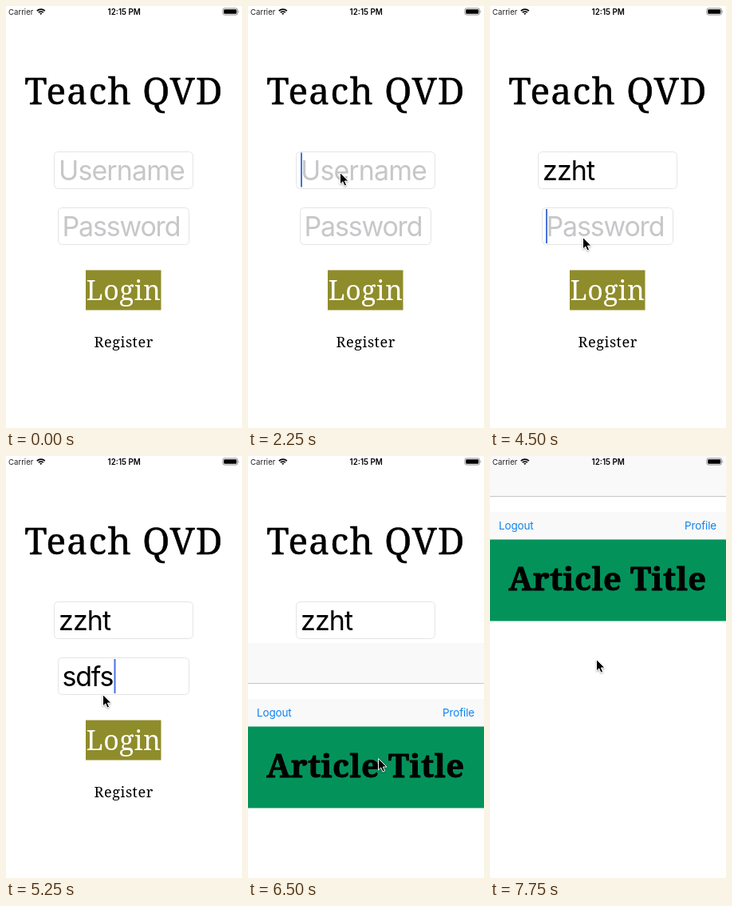
Recreate the animation shown at these times as an HTML page. Size 296 px wide and 528 px high, loop 8 s.

```html
<!DOCTYPE html>
<html lang="en">
<head>
<meta charset="utf-8">
<title>Login flow</title>
<style>
html, body { margin: 0; height: 100%; overflow: hidden; background: #fff; }
svg { display: block; width: 100vw; height: 100vh; }
text { font-family: Inter, Roboto, sans-serif; white-space: pre; }
.slab { font-family: "Noto Serif", serif; stroke-linejoin: round; }
.field rect { fill: #fff; stroke: #e4e4e4; }
.field text { font-size: 34px; letter-spacing: -.9px; }
#pass { letter-spacing: -1.2px; }
.hint { fill: #c7c7ca; }
.caret { fill: #4673dc; }
.link { font-size: 13.5px; letter-spacing: -.15px; fill: #0f83ee; }
</style>
</head>
<body>
<svg viewBox="0 0 296 528">
  <text class="slab" x="148" y="123" font-size="46" letter-spacing="1.3" stroke="#000" stroke-width=".5" text-anchor="middle">Teach QVD</text>

  <g class="field">
    <rect x="60.5" y="182.5" width="174" height="46" rx="5"/>
    <text id="user" x="66" y="218"></text>
    <rect x="65.5" y="252.5" width="164" height="46" rx="5"/>
    <path id="select" d="M68 253h69v44h-69z" fill="#d0dfed"/>
    <text id="pass" x="70.5" y="288"></text>
  </g>
  <rect id="userCaret" class="caret" y="183.5" width="2" height="43"/>
  <rect id="passCaret" class="caret" y="254" width="2" height="43"/>

  <path d="M100 330.5h94.5v50h-94.5z" fill="#8f8c2b"/>
  <text class="slab" x="147.5" y="368" font-size="34" letter-spacing=".4" fill="#fff" text-anchor="middle">Login</text>
  <text class="slab" x="147.7" y="426.5" font-size="18.2" letter-spacing=".5" text-anchor="middle">Register</text>

  <g id="suggest">
    <path d="M68.5 298.5h73a18.8 18.8 0 0 1 0 37.6h-73z" fill="#fff" stroke="#c9c9cc"/>
    <text x="70" y="327.5" font-size="28" letter-spacing="-.8" fill="#0b74d4">adds</text>
    <path d="M139 314.5l5 5m0-5l-5 5" stroke="#b4b4b8"/>
  </g>

  <g id="sheet">
    <path d="M0 0h296v528H0z" fill="#fff"/>
    <path d="M0 0h296v50H0zM0 70h296v35H0z" fill="#f9f9f9"/>
    <path d="M0 50.5h296" stroke="#c6c6c6"/>
    <path d="M0 104.5h296v102H0z" fill="#04925b"/>
    <text class="link" x="11" y="92">Logout</text>
    <text class="link" x="284" y="92" text-anchor="end">Profile</text>
    <text class="slab" x="147.3" y="167.5" font-size="40" font-weight="700" letter-spacing=".4" stroke="#000" stroke-width=".8" text-anchor="middle">Article Title</text>
  </g>

  <g id="status">
    <text x="3" y="10.8" font-size="9.6" fill="#222">Carrier</text>
    <g fill="none" stroke="#000" stroke-width="1.7">
      <path d="M38.8 6.1a7.2 7.2 0 0 1 10 0M40.8 8.2a4.3 4.3 0 0 1 6 0"/>
      <path d="M43.8 11l-1.5-1.6a2.2 2.2 0 0 1 3 0z" fill="#000" stroke="none"/>
    </g>
    <text x="148.2" y="10.8" font-size="9.8" font-weight="600" text-anchor="middle">12:15 PM</text>
    <rect x="271.9" y="2.9" width="18.7" height="8.2" rx="2.3" fill="none" stroke="#777" stroke-width=".8"/>
    <rect x="273.2" y="4.2" width="16.1" height="5.6" rx="1.3"/>
    <path d="M291.6 5.5q1.6 1.5 0 3z" fill="#777"/>
  </g>

  <path id="pointer" d="M.5 .5V15L3.8 11.9L6 17.1L8.6 16L6.4 11H11z" stroke="#fff" stroke-width="1" stroke-linejoin="round" style="filter:drop-shadow(0 1px 1px #0005)"/>
</svg>
<script>
const LOOP = 8000;
const el = id => document.getElementById(id);

// Each track is a list of [start ms, value]; values hold until the next step.
const at = (track, t) => track.findLast(step => step[0] <= t)[1];

const pointer = [
  [0, null], [750, [151, 189]], [1000, [107, 231]], [1250, [110, 218]],
  [2000, [115, 208]], [4000, [112, 287]], [4250, [116, 289]],
  [5250, [121, 298]], [5500, [131, 340]], [5750, [133, 368]],
  [6000, [163, 378]], [7500, [145, 342]], [7750, [133, 254]]
];
const user = [[0, ""], [3500, "zz"], [3750, "zzht"]];
const pass = [[0, ""], [5000, "sd"], [5250, "sdfs"]];
const userCaret = [[0, null], [2250, 66], [3500, null], [4250, 131], [4500, null]];
const passCaret = [[0, null], [4500, 70], [5000, 106], [5250, 135.5], [5750, null], [6250, 135.5]];
const sheet = [[0, null], [6500, 234], [6750, 6], [7000, 0]];

function show(node, on) {
  node.style.display = on ? "" : "none";
}
function move(node, pos) {
  show(node, pos);
  if (pos) node.setAttribute("transform", `translate(${pos})`);
}
function fill(node, value, hint) {
  node.textContent = value || hint;
  node.classList.toggle("hint", !value);
}
function caret(node, x) {
  show(node, x !== null);
  if (x !== null) node.setAttribute("x", x);
}

function draw(t) {
  fill(el("user"), at(user, t), "Username");
  fill(el("pass"), at(pass, t), "Password");
  caret(el("userCaret"), at(userCaret, t));
  caret(el("passCaret"), at(passCaret, t));
  show(el("select"), t >= 5500);
  show(el("suggest"), t >= 5500);
  const top = at(sheet, t);
  move(el("sheet"), top === null ? null : [0, top]);
  move(el("pointer"), at(pointer, t));
}

function tick() {
  draw(performance.now() % LOOP);
  requestAnimationFrame(tick);
}
tick();
</script>
</body>
</html>
```
